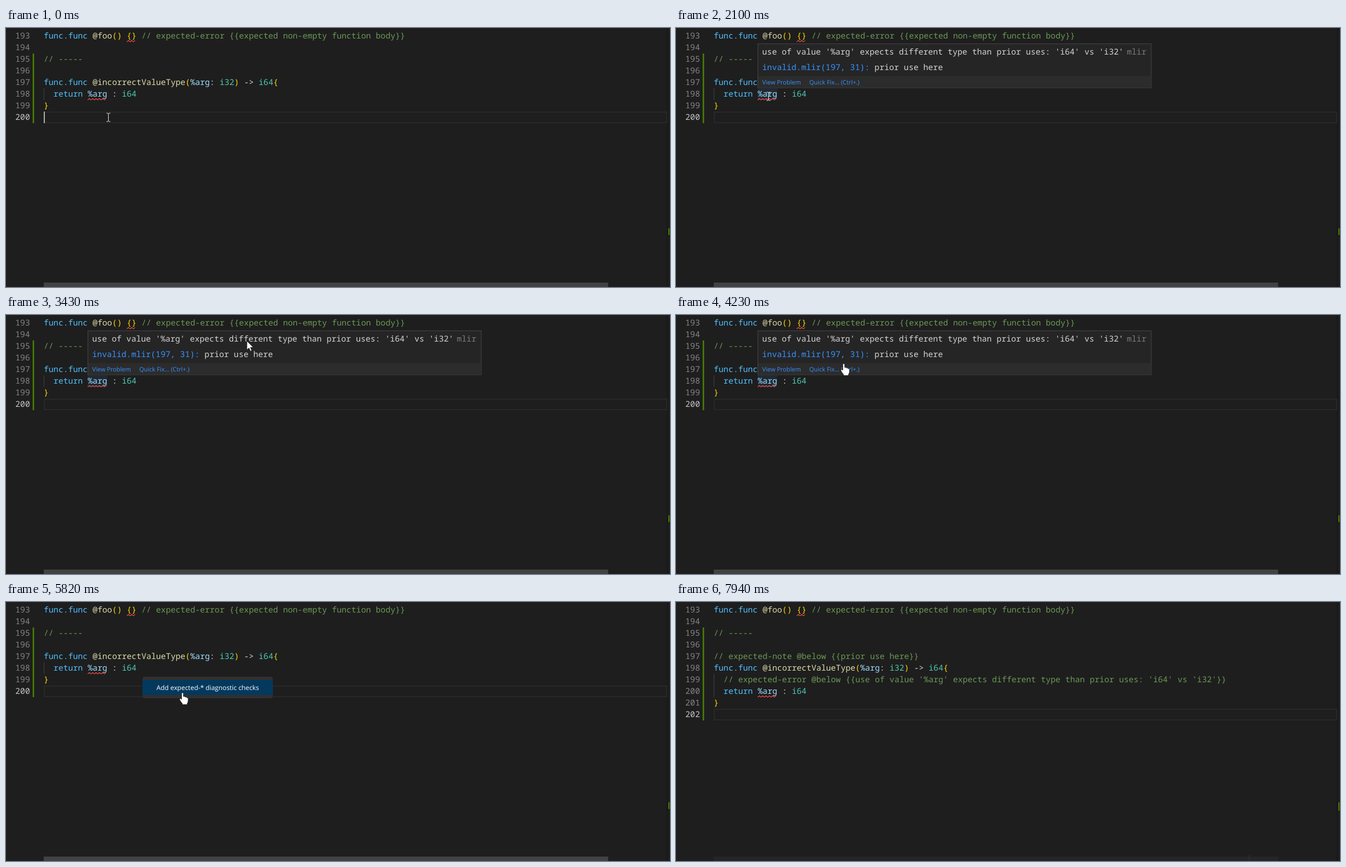
An HTML page for the animation above (8270 ms loop, 1196 by 468 pixels).

```html
<!DOCTYPE html>
<html lang="en">
<head>
<meta charset="utf-8">
<title>Editor quick fix</title>
<style>
html, body { margin: 0; width: 100%; height: 100%; overflow: hidden; background: #1e1e1e; }
svg { display: block; width: 100vw; height: 100vh; }
text { font: 14.66px "Noto Sans Mono", "DejaVu Sans Mono", monospace; white-space: pre; text-rendering: geometricPrecision; }
.ui { font-family: "Open Sans", "Noto Sans", sans-serif; }
</style>
</head>
<body>
<svg id="stage" viewBox="0 0 1196 468"></svg>
<script>
const LOOP = 8270, TICK = 66.27, CH = 8.797, LEFT = 68, ROW = 21, TOP = 4;
const C = {
  key: '#4fc1ff', name: '#dcdcaa', brace: '#ffd700', arg: '#9cdcfe', type: '#4ec9b0',
  plain: '#d4d4d4', note: '#6a9955', num: '#858585', active: '#c6c6c6',
  link: '#3794ff', error: '#f14c4c', added: '#487e02'
};

// ---- Drawing helpers (all return SVG markup)
const rect = (x, y, w, h, fill, more = '') =>
  `<rect x="${x}" y="${y}" width="${w}" height="${h}" fill="${fill}" ${more}/>`;
const text = (x, y, fill, s, more = '') =>
  `<text x="${x}" y="${y}" fill="${fill}" ${more}>${s.replace(/</g, '&lt;').replace(/>/g, '&gt;')}</text>`;
const label = (x, y, fill, s, size) => text(x, y, fill, s, `class="ui" style="font-size:${size}px"`);
const group = (id, body) => `<g id="${id}">${body}</g>`;
const rowTop = row => TOP + row * ROW;
const colX = col => LEFT + col * CH;

function squiggle(row, col, chars) {
  const x = colX(col), y = rowTop(row) + 21;
  let d = `M${x} ${y}`;
  for (let i = 1; i * 3 <= chars * CH; i++) d += `L${x + i * 3} ${y - (i % 2) * 2.6}`;
  return `<path d="${d}" fill="none" stroke="${C.error}" stroke-width="1.1"/>`;
}

// ---- Code lines: tokens are [column, colour, text]
const note = (col, s) => [[col, 'note', s]];
const head = [
  [[0, 'key', 'func.func'], [10, 'name', '@foo'], [14, 'brace', '()'], [17, 'brace', '{}'],
   [20, 'note', '// expected-error {{expected non-empty function body}}']],
  [], note(0, '// -----'), []
];
const signature = [
  [0, 'key', 'func.func'], [10, 'name', '@incorrectValueType'], [29, 'brace', '('],
  [30, 'arg', '%arg'], [34, 'plain', ':'], [36, 'type', 'i32'], [39, 'brace', ')'],
  [41, 'plain', '->'], [44, 'type', 'i64'], [47, 'brace', '{']
];
const body = [[2, 'key', 'return'], [9, 'arg', '%arg'], [14, 'plain', ':'], [16, 'type', 'i64']];
const end = [[0, 'brace', '}']];
const message = "use of value '%arg' expects different type than prior uses: 'i64' vs 'i32'";

const before = [...head, signature, body, end, []];
const after = [
  ...head, note(0, '// expected-note @below {{prior use here}}'), signature,
  note(2, `// expected-error @below {{${message}}}`), body, end, []
];

function page(id, lines) {
  const last = lines.length - 1, ret = lines.indexOf(body), guide = lines.indexOf(signature) + 1;
  let out = rect(LEFT + 1, rowTop(last) + 1, 1121, 19, 'none', 'stroke="#282828" stroke-width="2"');
  out += rect(48, rowTop(2), 2.6, (last - 1) * ROW, C.added);
  out += rect(LEFT, rowTop(guide), 1, (ret - guide + 1) * ROW, '#404040');
  out += rect(1193, 362, 2, last > 7 ? 15 : 12, C.added);
  lines.forEach((line, row) => {
    const y = rowTop(row) + 15;
    out += text(16.8, y, row === last ? C.active : C.num, String(193 + row));
    for (const [col, color, s] of line) out += text(colX(col), y, C[color], s);
  });
  return group(id, out + squiggle(0, 17, 2) + squiggle(ret, 9, 4));
}

const hover =
  rect(147.5, 28.5, 708.5, 79.5, '#252526', 'stroke="#454545"') +
  rect(148, 87, 707.5, 20.5, '#2c2c2d') +
  text(155.3, 48, C.plain, message) + text(812, 48, '#7c7c7c', 'mlir') +
  text(155.3, 76, C.link, 'invalid.mlir(197, 31):') + text(357.6, 76, C.plain, 'prior use here') +
  label(155.3, 102, C.link, 'View Problem', 10.9) + label(240, 102, C.link, 'Quick Fix… (Ctrl+.)', 10.9);

const menu =
  rect(246, 135, 234.5, 39, '#303031', 'rx="4"') + rect(246, 141, 234.5, 27, '#04395e') +
  label(271, 159, '#fff', 'Add expected-* diagnostic checks', 11.82);

const shapes = {
  beam: '<path d="M-3.5-7.5H-1L0-6.5 1-7.5H3.5M0-6.5V6.5M-3.5 7.5H-1L0 6.5 1 7.5H3.5" fill="none" stroke="#e8e8e8"/>',
  arrow: '<path d="M0 0V16L3.8 12.6 6.3 18.4 8.8 17.4 6.4 11.6H11.5Z" fill="#fff" stroke="#111" stroke-width=".8"/>',
  hand: '<path d="M-1.7 12V1.8Q-1.6 0 0 0T1.7 1.8V7Q4.2 6.2 4.7 8 7 7.2 7.6 9 10 8.6 10.2 11V15Q10 18 8.5 19.5V21.5H-.5V19.5Q-3 17-5.2 12.8-5.4 10.4-3.4 10.6Z" fill="#fff" stroke="#111" stroke-width=".8"/>'
};

const stage = document.getElementById('stage');
stage.innerHTML =
  rect(0, 0, 1196, 468, '#1e1e1e') + rect(1190, 0, 2, 468, '#181818') +
  group('mark', rect(147, 109, 35.5, 21, '#202a34')) +
  page('before', before) + page('after', after) +
  group('slider', rect(68, 460, 1016.5, 8, '#424242')) +
  group('caret', rect(LEFT, 0, 2, ROW, '#aeafad')) +
  group('hover', hover) + group('menu', menu) +
  group('pointer', Object.keys(shapes).map(k => group(k, shapes[k])).join(''));

const el = id => document.getElementById(id);
const show = (id, v) => el(id).setAttribute('opacity', +v);
const move = (id, x, y) => el(id).setAttribute('transform', `translate(${x} ${y})`);

// ---- Timing: pointer path [ms, x, y] and caret toggles
const path = [
  [0, 184.5, 161.5], [314, 184.5, 161.5], [840, 172, 139.5], [1044, 172, 139.5], [1310, 166.5, 123.5],
  [2174, 166.5, 123.5], [2630, 295, 56], [3040, 393, 44], [3400, 437, 46], [3900, 327, 70],
  [4230, 302, 88], [4360, 301.5, 99.5], [5354, 301.5, 99.5], [5820, 318, 164], [6090, 319, 155],
  [6684, 319, 155], [6890, 353, 185], [7480, 1032.5, 465.5], [LOOP, 1032.5, 465.5]
];
const blinks = [120, 620, 1110, 1570, 2100, 2590, 3100, 3600, 4100, 4560, 5020, 6290, 6950, 7450, 7940];

// Tangent at a path point, zero where the pointer rests
function slope(i, axis) {
  const a = path[i - 1], p = path[i], b = path[i + 1];
  if (!a || !b || a[axis] === p[axis] || b[axis] === p[axis]) return 0;
  return (b[axis] - a[axis]) / (b[0] - a[0]);
}

function along(t, axis) {
  const i = Math.max(1, path.findIndex(p => p[0] >= t));
  const a = path[i - 1], b = path[i], span = b[0] - a[0];
  const u = (t - a[0]) / span, v = 1 - u;
  return a[axis] * v * v * (1 + 2 * u) + b[axis] * u * u * (1 + 2 * v) +
    span * u * v * (v * slope(i - 1, axis) - u * slope(i, axis));
}

const inside = (x, y, x0, y0, x1, y1) => x >= x0 && x < x1 && y >= y0 && y < y1;

function pointerKind(x, y, hoverOn, menuOn) {
  if (menuOn && inside(x, y, 246, 135, 481, 174)) return 'hand';
  if (!hoverOn || !inside(x, y, 147, 28, 856, 108)) return 'beam';
  return inside(x, y, 155, 64, 349, 80) || inside(x, y, 155, 87, 332, 108) ? 'hand' : 'arrow';
}

function draw(t) {
  const hoverOn = t >= 1640 && t < 4890, menuOn = t >= 5020 && t < 6290, edited = t >= 6420;
  show('hover', hoverOn ? (t < 1710 ? 0.5 : 1) : 0);
  show('mark', hoverOn);
  show('menu', menuOn);
  show('before', !edited);
  show('after', edited);
  show('caret', blinks.filter(b => b <= t).length % 2 === 0);
  move('caret', 0, rowTop(edited ? 9 : 7));
  show('slider', t < 7880 ? 1 : t < 7940 ? 0.6 : 0.2);
  show('pointer', t < 7880 ? 1 : t < 7940 ? 0.5 : 0.08);

  // The pointer is sampled about 15 times a second
  const s = Math.max(0, 118 + TICK * Math.floor((t - 111) / TICK));
  const x = along(s, 1), y = along(s, 2), kind = pointerKind(x, y, hoverOn, menuOn);
  move('pointer', x, y);
  for (const k in shapes) show(k, k === kind);
}

const start = performance.now();
function frame() {
  draw((performance.now() - start) % LOOP);
  requestAnimationFrame(frame);
}
frame();
</script>
</body>
</html>
```
